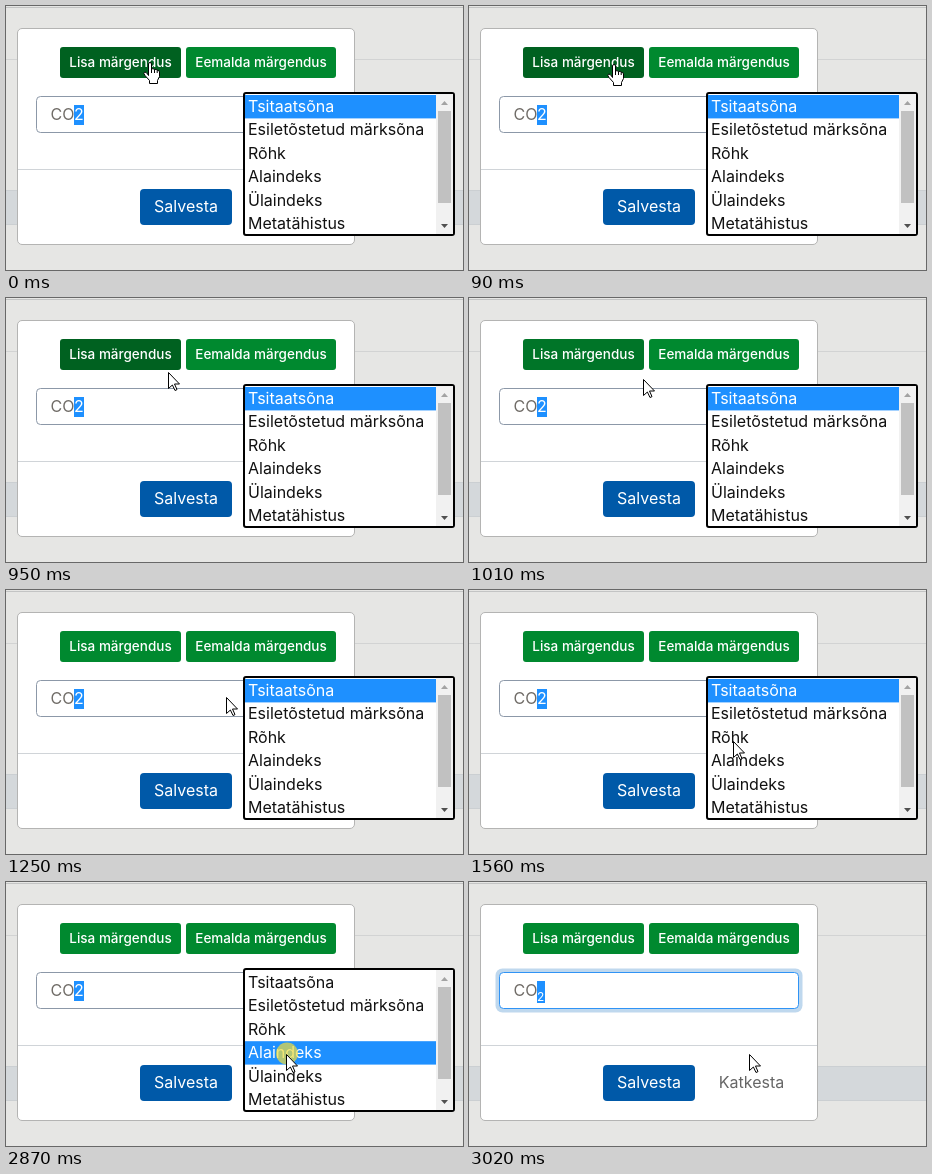
These frames come from a looping animation (457 by 264 pixels, 4.11 s). An HTML page:

```html
<!DOCTYPE html>
<html lang="et">
<head>
<meta charset="utf-8">
<title>Märgendus</title>
<style>
  html, body { margin: 0; width: 100%; height: 100%; overflow: hidden; background: #e6e6e4; }
  svg { display: block; width: 457px; height: 264px; font: 16px Inter, "Open Sans", sans-serif; }
  text { white-space: pre; }
  .small { font-size: 13.5px; font-weight: 500; }
  .light { fill: #fff; }
  .center { text-anchor: middle; }
  .field { fill: #6f6b66; }
  .select { fill: #1e90ff; }
  .cursor { fill: #fff; stroke: #000; stroke-linejoin: round; }
</style>
</head>
<body>
<svg viewBox="0 0 457 264">
  <rect width="457" height="264" fill="#e6e6e4"/>
  <rect y="1" width="457" height="1" fill="#c3c4c4"/>
  <rect y="53" width="457" height="1" fill="#d2d3d3"/>
  <rect y="184" width="457" height="35" fill="#d4d8db"/>
  <path d="M0 184.5H457M0 218.5H457" stroke="#cbcfd2"/>

  <rect x="11.5" y="22.5" width="337" height="216" rx="4.5" fill="#fff" stroke="#b4b4b3"/>
  <rect x="12" y="163" width="336" height="1" fill="#d0d4d8"/>

  <rect id="add" x="54" y="41" width="121" height="31" rx="3"/>
  <text class="small light center" x="114.5" y="61">Lisa märgendus</text>
  <rect x="180" y="41" width="150" height="31" rx="3" fill="#00892f"/>
  <text class="small light center" x="255" y="61">Eemalda märgendus</text>

  <rect id="glow" x="26.5" y="86.5" width="307" height="44" rx="7" fill="#bfd8ee"/>
  <rect id="input" x="30.5" y="90.5" width="299" height="36" rx="4" fill="#fff"/>
  <text class="field" x="44.5" y="114">CO</text>
  <g id="plain">
    <rect class="select" x="68" y="99" width="10" height="20"/>
    <text class="light" x="68" y="114">2</text>
  </g>
  <g id="subscript">
    <rect class="select" x="68" y="99" width="8" height="22"/>
    <text class="light" x="68" y="119" font-size="12">2</text>
  </g>

  <rect x="134" y="183" width="92" height="36" rx="4" fill="#0059a8"/>
  <text class="light center" x="180" y="206">Salvesta</text>
  <text class="center" x="282.5" y="206" fill="#666">Katkesta</text>

  <g id="menu">
    <rect x="238" y="87" width="210" height="142" rx="2" fill="#fff" stroke="#000" stroke-width="2"/>
    <rect id="choice" class="select" x="239" width="191" height="23.4"/>
    <g id="options"></g>
    <rect x="430" y="88" width="17" height="140" fill="#f1f1f1"/>
    <rect x="432" y="105" width="13" height="92" fill="#c1c1c1"/>
    <path d="M435 99l3.5-4 3.5 4z" fill="#a3a3a3"/>
    <path d="M435 218l3.5 4 3.5-4z" fill="#505050"/>
  </g>

  <circle id="click" cx="281" cy="171.5" r="11" fill="#f0dc3c" fill-opacity=".7"/>
  <path id="arrow" class="cursor" d="M.5 .5V16.5L4.4 13 7 18.5 9 17.6 6.5 12H11.5Z"/>
  <g id="hand" class="cursor">
    <path d="M5.5 13.5V2a1.5 1.5 0 0 1 3 0V7q1.5-1 3 .5q2-.7 2.7 .7q2-.2 2.3 1.8V14.5l-2 4v3H6.5v-3L2 13.5q-2-2.3-.5-3.3q1.5-.6 3 1.8z"/>
    <path d="M8.5 7v4M11.5 7.5V11M14.2 8.2V11"/>
  </g>
</svg>
<script>
  const LOOP = 4110, LEAVE = 950, PRESS = 2870, APPLY = 3020;
  const ROW_TOP = 89, ROW = 23.4;
  const labels = ["Tsitaatsõna", "Esiletõstetud märksõna", "Rõhk", "Alaindeks", "Ülaindeks", "Metatähistus"];
  // Pointer stops: time, x, y
  const stops = [
    [0, 137, 56], [90, 138, 58], [640, 139, 58], [700, 141, 60], [780, 145, 64], [860, 150, 68],
    [950, 162, 74], [1010, 174, 81], [1080, 191, 90], [1160, 208, 100],
    [1250, 220, 107], [1320, 232, 116], [1400, 243, 127], [1480, 254, 139], [1560, 264, 151],
    [1640, 272, 161], [1710, 278, 167], [1800, 279, 169], [1870, 280, 171], [1950, 280, 172]
  ];

  const el = id => document.getElementById(id);
  const show = (id, on) => { el(id).style.display = on ? "" : "none"; };

  labels.forEach((label, i) => {
    const text = document.createElementNS("http://www.w3.org/2000/svg", "text");
    text.setAttribute("x", 242);
    text.setAttribute("y", Math.round(ROW_TOP + 17 + i * ROW));
    text.textContent = label;
    el("options").append(text);
  });

  function draw(t) {
    const [, x, y] = stops.findLast(stop => stop[0] <= t);
    const chosen = t < PRESS ? 0 : 3;
    const applied = t >= APPLY;

    for (const id of ["hand", "arrow"]) el(id).setAttribute("transform", `translate(${x} ${y})`);
    show("hand", t < LEAVE);
    show("arrow", t >= LEAVE);
    show("click", t >= PRESS && !applied);
    show("menu", !applied);
    show("plain", !applied);
    show("subscript", applied);
    show("glow", applied);

    el("add").setAttribute("fill", t < 1010 ? "#006120" : t < 1080 ? "#007528" : "#00892f");
    el("input").setAttribute("stroke", applied ? "#2f93f5" : "#8c98a8");
    el("choice").setAttribute("y", ROW_TOP + chosen * ROW);
    [...el("options").children].forEach((option, i) =>
      option.setAttribute("fill", i === chosen ? "#fff" : "#111"));
  }

  const start = performance.now();
  function tick() {
    draw((performance.now() - start) % LOOP);
    requestAnimationFrame(tick);
  }
  tick();
</script>
</body>
</html>
```
